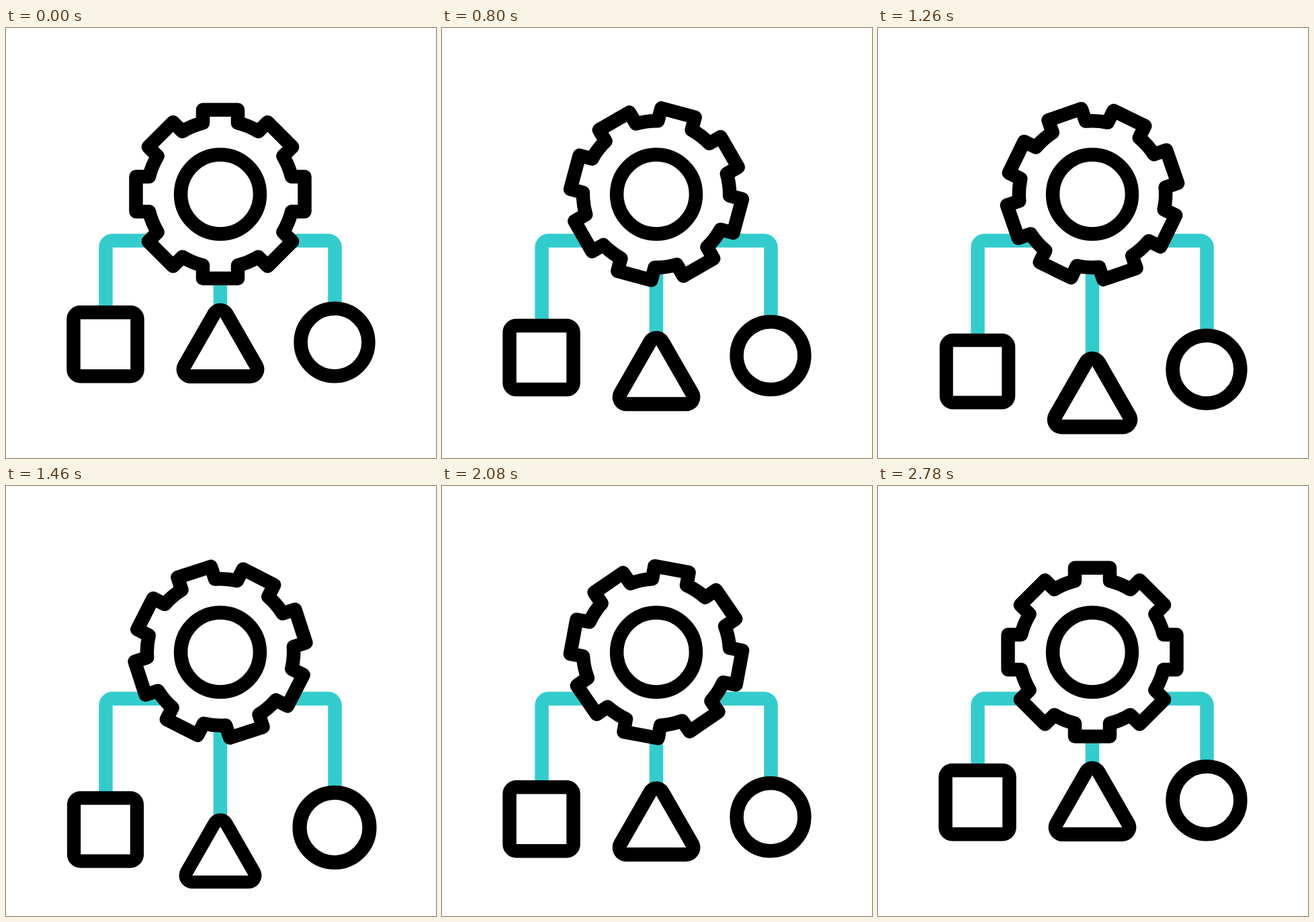
Recreate the animation shown at these times as an HTML page. Size 640 by 640 pixels, loop 3000 ms.

```html
<!DOCTYPE html>
<html lang="en">
<head>
<meta charset="utf-8">
<title>Gear and shapes</title>
<style>
  html, body { margin: 0; width: 100%; height: 100%; overflow: hidden; background: #fff; }
  svg { display: block; width: 100vw; height: 100vh; }
  .wire { fill: none; stroke: #33cccc; stroke-width: 20.5; }
  .ink { fill: #fff; stroke: #000; stroke-width: 20.5; stroke-linejoin: round; }
  .thick { stroke-width: 42; paint-order: stroke; }
</style>
</head>
<body>
<svg viewBox="0 0 640 640">
  <path class="wire" id="left"/>
  <path class="wire" id="right"/>
  <path class="wire" id="stem"/>
  <g id="square"><rect class="ink" x="-47.5" y="-47.5" width="95" height="95" rx="10"/></g>
  <g id="triangle"><path class="ink thick" d="M0 -38.2L44.4 39.2H-44.4Z"/></g>
  <g id="circle"><circle class="ink" r="50.4"/></g>
  <path class="ink" id="gear"/>
  <circle class="ink" cx="319" cy="247.5" r="58.9"/>
</svg>
<script>
  const LOOP = 3000;
  const PULSE = 460;
  const $ = id => document.getElementById(id);
  const set = (id, name, value) => $(id).setAttribute(name, value);

  // Eased progress from 0 to 1 between two times
  function ramp(t, from, to) {
    const u = Math.min(1, Math.max(0, (t - from) / (to - from)));
    return u * u * (3 - 2 * u);
  }

  // The gear turns forward, swings back past its rest and settles
  const turn = t => 27 * ramp(t, 80, 1420) - 37 * ramp(t, 1720, 2500) + 10 * ramp(t, 2500, 2720);

  const sideDrop = t => 40.5 * ramp(t, 320, 1296) - 42 * ramp(t, 2008, 2185) + 1.5 * ramp(t, 2500, 2700);
  const midDrop = t => 74 * (ramp(t, 218, 1300) - ramp(t, 1947, 2185));

  // Each shape grows, shrinks and returns once
  function pulse(t, start) {
    const u = (t - start) / PULSE;
    return u > 0 && u < 1 ? 1 + 0.09 * Math.sin(2 * Math.PI * u) : 1;
  }

  function gearPath() {
    const tooth = [[-26, -106], [-26, -125.5], [26, -125.5], [26, -106]];
    const arc = 'A109.1 109.1 0 0 1 ';
    let d = '';
    for (let k = 0; k < 8; k++) {
      const a = k * Math.PI / 4, c = Math.cos(a), s = Math.sin(a);
      tooth.forEach(([x, y], i) => {
        const cmd = i ? 'L' : k ? arc : 'M';
        d += cmd + (x * c - y * s).toFixed(2) + ' ' + (x * s + y * c).toFixed(2);
      });
    }
    return d + arc + '-26 -106Z';
  }

  function place(id, x, y, scale) {
    set(id, 'transform', `translate(${x} ${y}) scale(${scale})`);
  }

  function draw(t) {
    const side = sideDrop(t), mid = midDrop(t);
    set('gear', 'transform', `translate(319 247.3) rotate(${turn(t)})`);
    place('square', 148, 470.8 + side, pulse(t, 1010));
    place('triangle', 319, 468.8 + mid, pulse(t, 1055));
    place('circle', 489, 467.8 + side, pulse(t, 1435));
    set('left', 'd', `M260 316.6H158.5a10 10 0 0 0 -10 10V${470 + side}`);
    set('right', 'd', `M378 316.6H479.5a10 10 0 0 1 10 10V${470 + side}`);
    set('stem', 'd', `M319 300V${470 + mid}`);
  }

  set('gear', 'd', gearPath());
  const start = performance.now();
  function frame() {
    draw((performance.now() - start) % LOOP);
    requestAnimationFrame(frame);
  }
  draw(0);
  requestAnimationFrame(frame);
</script>
</body>
</html>
```
